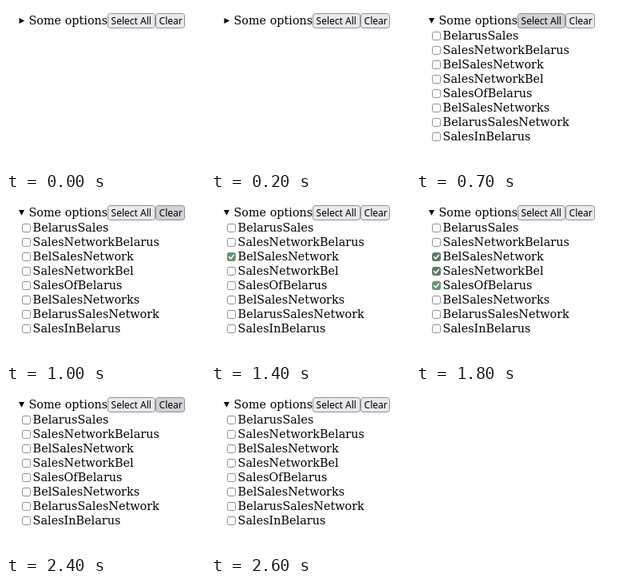
Recreate the animation shown at these times as an HTML page with a canvas. Size 249 by 205 pixels, loop 2.7 s.

```html
<!DOCTYPE html>
<html lang="en">
<head>
<meta charset="utf-8">
<title>Some options</title>
<style>
  html, body { margin: 0; width: 100%; height: 100%; overflow: hidden; background: #fff; }
  canvas { display: block; width: 249px; height: 205px; }
</style>
</head>
<body>
<canvas id="stage"></canvas>
<script>
const W = 249, H = 205, LOOP = 2700;
const canvas = document.getElementById('stage');
const ctx = canvas.getContext('2d', { alpha: false });
const ratio = window.devicePixelRatio || 1;
canvas.width = W * ratio;
canvas.height = H * ratio;
ctx.scale(ratio, ratio);

const BODY_FONT = '14.4px "DejaVu Serif", serif';
const BUTTON_FONT = '12px "Noto Sans", "Open Sans", sans-serif';
const ROW_HEIGHT = 18;
const LABELS = [
  'BelarusSales', 'SalesNetworkBelarus', 'BelSalesNetwork', 'SalesNetworkBel',
  'SalesOfBelarus', 'BelSalesNetworks', 'BelarusSalesNetwork', 'SalesInBelarus'
];
const ALL = LABELS.map((_, i) => i);

// Each step lists what changes at that moment; hover is a row index or a button name.
const STEPS = [
  { at: 0, open: false, checked: [], hover: null },
  { at: 300, open: true },
  { at: 400, hover: 0 },
  { at: 600, hover: 'select' },
  { at: 800, checked: ALL },
  { at: 900, hover: 'clear' },
  { at: 1000, checked: [] },
  { at: 1200, hover: null },
  { at: 1300, hover: 2 },
  { at: 1400, checked: [2] },
  { at: 1500, hover: 3 },
  { at: 1600, checked: [2, 3] },
  { at: 1700, hover: 4 },
  { at: 1800, checked: [2, 3, 4] },
  { at: 1900, hover: 5 },
  { at: 2000, checked: [2, 3, 4, 5] },
  { at: 2100, hover: null },
  { at: 2200, hover: 'clear' },
  { at: 2300, checked: [] },
  { at: 2500, hover: null }
];

function stateAt(time) {
  return Object.assign({}, ...STEPS.filter(step => step.at <= time));
}

function text(value, x, y, font) {
  ctx.font = font;
  ctx.fillStyle = '#000';
  ctx.fillText(value, x, y);
}

function box(x, y, w, h, radius, fill, stroke) {
  ctx.beginPath();
  ctx.roundRect(x + 0.5, y + 0.5, w - 1, h - 1, radius);
  ctx.fillStyle = fill;
  ctx.fill();
  ctx.lineWidth = 1;
  ctx.strokeStyle = stroke;
  ctx.stroke();
}

function path(points) {
  ctx.beginPath();
  points.forEach(([x, y]) => ctx.lineTo(x, y));
}

function drawMarker(open) {
  path(open ? [[16, 15], [23, 15], [19.5, 21.7]]
            : [[16.5, 14.9], [23.2, 18.4], [16.5, 21.9]]);
  ctx.fillStyle = '#000';
  ctx.fill();
}

function drawButton(label, x, width, hovered) {
  box(x, 9, width, 19, 3, hovered ? '#d0d0d7' : '#e9e9ed', '#8f8f9d');
  text(label, x + 4.6, 23, BUTTON_FONT);
}

function drawCheckbox(y, checked, hovered) {
  if (!checked) {
    box(20, y, 11, 11, 2, '#fff', hovered ? '#5b5b66' : '#8f8f9d');
    return;
  }
  const accent = hovered ? '#6a9570' : '#5e7a66';
  box(20, y, 11, 11, 2, accent, accent);
  path([[22.6, y + 5.7], [24.7, y + 7.9], [28.5, y + 3.3]]);
  ctx.lineWidth = 1.6;
  ctx.lineCap = ctx.lineJoin = 'round';
  ctx.strokeStyle = '#fff';
  ctx.stroke();
}

function draw(time) {
  const { open, checked, hover } = stateAt(time);
  ctx.fillStyle = '#fff';
  ctx.fillRect(0, 0, W, H);

  drawMarker(open);
  text('Some options', 28.4, 23, BODY_FONT);
  drawButton('Select All', 127, 60, hover === 'select');
  drawButton('Clear', 187, 37, hover === 'clear');

  if (open) {
    LABELS.forEach((label, i) => {
      const y = 32 + i * ROW_HEIGHT;
      drawCheckbox(y, checked.includes(i), hover === i);
      text(label, 33.6, y + 10, BODY_FONT);
    });
  }
}

const start = performance.now();
function tick() {
  draw((performance.now() - start) % LOOP);
  requestAnimationFrame(tick);
}
tick();
</script>
</body>
</html>
```
